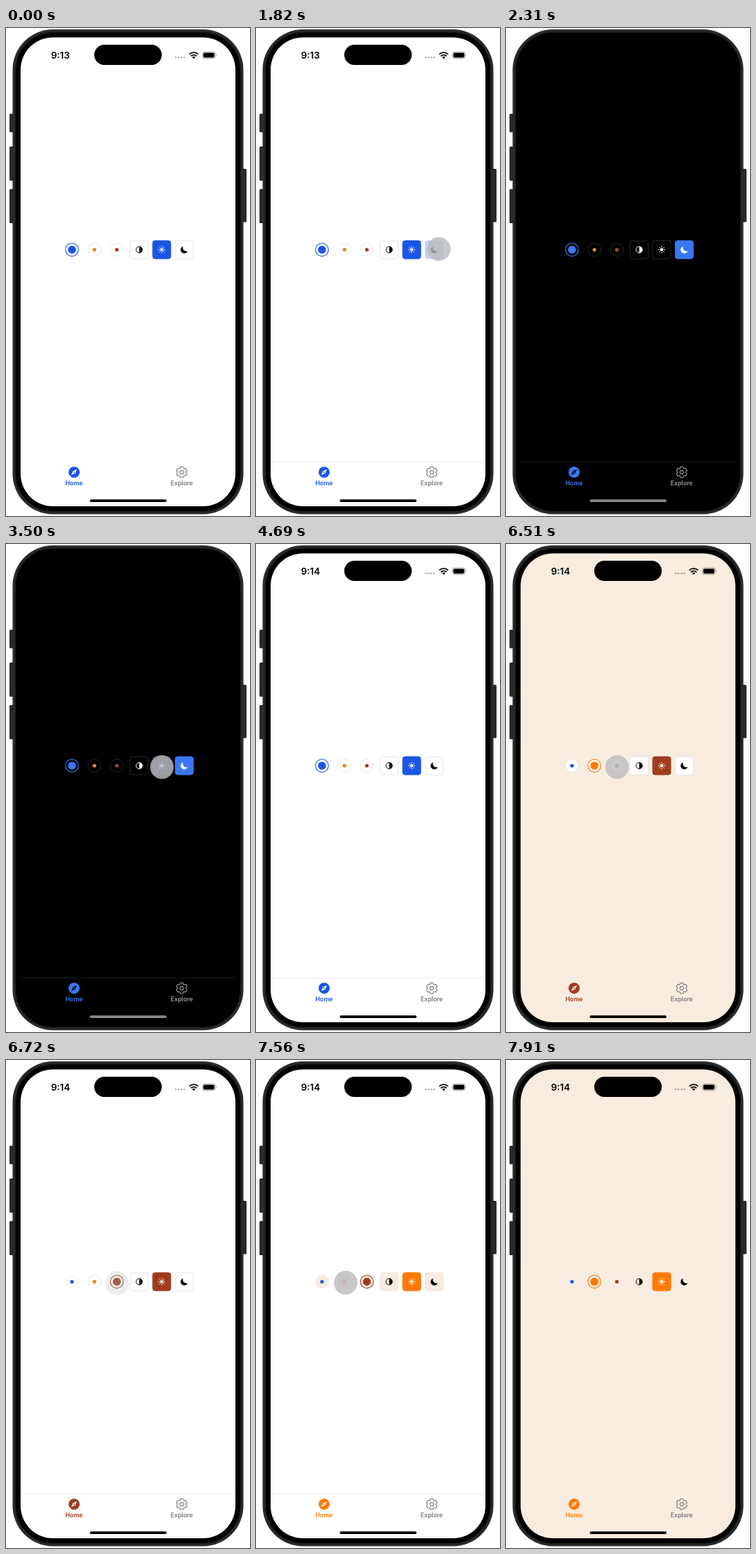
Write an HTML page that moves like this. It is 351x700 px and loops after 8000 ms.

```html
<!DOCTYPE html>
<html lang="en">
<head>
<meta charset="utf-8">
<title>Theme switcher</title>
<style>
  html, body { margin: 0; width: 100%; height: 100%; overflow: hidden; background: #fff; }
  svg { display: block; width: 100%; height: 100%; }
  text { font-family: Inter, "Liberation Sans", sans-serif; font-weight: 600; }
</style>
</head>
<body>
<svg id="stage" viewBox="0 0 351 700" xmlns="http://www.w3.org/2000/svg">
  <g fill="#292b2a">
    <rect x="5" y="123" width="8" height="26.5" rx="1.5"/>
    <rect x="5" y="170" width="8" height="49" rx="1.5"/>
    <rect x="5" y="231" width="8" height="49" rx="1.5"/>
    <rect x="338" y="202" width="8" height="76.5" rx="1.5"/>
  </g>
  <rect x="9.5" y="2" width="332" height="695.5" rx="58" fill="#202322"/>
  <rect x="10.8" y="3.3" width="329.4" height="692.9" rx="56.7" fill="none" stroke="#363938" stroke-width="1"/>
  <rect x="14" y="6.5" width="323" height="686.5" rx="53.5"/>
  <rect id="page" x="21" y="13.5" width="309" height="672.5" rx="46.5"/>

  <text id="clock" x="64.7" y="43.8" font-size="13.4"></text>
  <rect x="127" y="24" width="97" height="29" rx="14.5"/>
  <g fill-opacity=".27">
    <circle cx="244.2" cy="42.2" r="1.4"/><circle cx="248.3" cy="42.2" r="1.4"/>
    <circle cx="252.4" cy="42.2" r="1.4"/><circle cx="256.5" cy="42.2" r="1.4"/>
  </g>
  <g fill="none" stroke="#000" stroke-width="1.9">
    <path d="M263.7 37.7a8.9 8.9 0 0 1 12.6 0M266 40.3a5.7 5.7 0 0 1 8 0"/>
    <path d="M267.8 41.9a3.1 3.1 0 0 1 4.4 0L270 44.2z" fill="#000" stroke="none"/>
  </g>
  <rect x="282.4" y="34.2" width="18.8" height="9.6" rx="3" fill="none" stroke="#000" stroke-opacity=".38" stroke-width=".9"/>
  <rect x="283.8" y="35.6" width="16" height="6.8" rx="1.8"/>
  <path d="M302.2 37.5q1.5 1.5 0 3z" fill-opacity=".45"/>

  <g id="dots"></g>
  <g id="buttons"></g>

  <path id="tabLine" d="M21.5 622.5H329.5" stroke-width="1"/>
  <g id="home">
    <circle cx="98" cy="637.2" r="8"/>
    <path id="needle" d="M102.1 633.1l-2.5 5.6-5.7 2.6 2.5-5.7z"/>
    <circle cx="98" cy="637.2" r="1"/>
    <text x="98" y="656.3" font-size="8.8" text-anchor="middle">Home</text>
  </g>
  <g id="explore">
    <path id="gear" fill="none" stroke-width="1.1" stroke-linejoin="round"/>
    <circle cx="252.8" cy="637.2" r="2.6" fill="none" stroke-width="1.1"/>
    <text x="252.8" y="656.3" font-size="8.8" text-anchor="middle" stroke="none">Explore</text>
  </g>
  <rect id="indicator" x="120.5" y="676.2" width="110.5" height="3.8" rx="1.9"/>
  <circle id="touch" r="17" fill="#bcbcbe"/>
</svg>
<script>
const LOOP = 8000;
const $ = id => document.getElementById(id);

const HUES = {
  light: { blue: '#1a55e6', orange: '#ff7a00', brown: '#a03c1e' },
  dark: { blue: '#3878f4', orange: '#ff851b', brown: '#9c4a2c' }
};
const MODES = {
  light: { ink: '#000', muted: '#7b7b80', line: '#ebebed', border: '#e7e7ee', indicator: '#000' },
  dark: { ink: '#fff', muted: '#98989d', line: '#1b1b1d', border: '#252a2d', indicator: '#88888a' }
};
const START = { mode: 'light', hue: 'blue' };

// Widgets take the new theme at "skin"; page and selection follow at "page".
const TAPS = [
  { x: 263, y: 317, down: 1570, skin: 1885, page: 1955, key: 'moon', theme: { mode: 'dark', hue: 'blue' } },
  { x: 224.3, y: 320, down: 3280, skin: 3565, page: 3635, key: 'sun', theme: { mode: 'light', hue: 'blue' } },
  { x: 127.5, y: 320, down: 4740, skin: 5105, page: 5175, theme: { mode: 'light', hue: 'orange' } },
  { x: 159.8, y: 320, down: 6230, skin: 6490, page: 6575, theme: { mode: 'light', hue: 'brown' } },
  { x: 129, y: 319.5, down: 7270, skin: 7540, page: 7625, theme: { mode: 'light', hue: 'orange' } }
];

function add(parent, tag, attrs) {
  const el = document.createElementNS('http://www.w3.org/2000/svg', tag);
  set(el, attrs);
  return parent.appendChild(el);
}
function set(el, attrs) {
  for (const name in attrs) el.setAttribute(name, attrs[name]);
}
const clamp = v => Math.max(0, Math.min(1, v));
const ease = v => v * v * (3 - 2 * v);

const dots = Object.keys(HUES.light).map((hue, i) => {
  const at = { cx: 94.9 + i * 32.3, cy: 318 };
  return {
    hue,
    ring: add($('dots'), 'circle', { ...at, r: 9.3 }),
    core: add($('dots'), 'circle', at)
  };
});

const rays = Array.from({ length: 8 }, (_, i) => {
  const a = i * Math.PI / 4, c = Math.cos(a), s = Math.sin(a);
  return `M${3.4 * c} ${3.4 * s}L${4.8 * c} ${4.8 * s}`;
}).join('');
const ICONS = {
  contrast: [
    ['circle', { r: 4.5, fill: 'none', 'stroke-width': 1 }],
    ['path', { d: 'M0-4.5a4.5 4.5 0 0 1 0 9z', stroke: 'none' }]
  ],
  sun: [
    ['circle', { r: 2.3, stroke: 'none' }],
    ['path', { d: rays, 'stroke-width': 1, 'stroke-linecap': 'round' }]
  ],
  moon: [['path', { d: 'M-1.7-4.8a5.2 5.2 0 1 0 6.6 6.7a5.2 5.2 0 0 1-6.6-6.7z', stroke: 'none' }]]
};
const buttons = Object.keys(ICONS).map((key, i) => {
  const x = 191.6 + i * 32.4;
  const box = { x: x - 13, y: 305, width: 26, height: 26, rx: 3.5 };
  const button = {
    key,
    card: add($('buttons'), 'rect', box),
    tint: add($('buttons'), 'rect', box),
    icon: add($('buttons'), 'g', { transform: `translate(${x} 318)` })
  };
  ICONS[key].forEach(([tag, attrs]) => add(button.icon, tag, attrs));
  return button;
});

// Six flat teeth around the gear.
const teeth = [];
for (let i = 0; i < 6; i++) {
  for (const [turn, r] of [[-25, 6], [-14, 8], [14, 8], [25, 6]]) {
    const a = (i * 60 - 90 + turn) * Math.PI / 180;
    teeth.push(`${(252.8 + r * Math.cos(a)).toFixed(2)} ${(637.2 + r * Math.sin(a)).toFixed(2)}`);
  }
}
$('gear').setAttribute('d', `M${teeth.join('L')}Z`);

const paper = ({ mode, hue }) =>
  mode === 'dark' ? '#000' : hue === 'orange' ? '#f8ece0' : '#fff';

function themeAt(t, stage) {
  return TAPS.reduce((theme, tap) => t >= tap[stage] ? tap.theme : theme, START);
}

function render(t) {
  const skin = themeAt(t, 'skin'), page = themeAt(t, 'page');
  const colors = MODES[skin.mode], pageColors = MODES[page.mode];
  const accent = HUES[skin.mode][skin.hue];
  const card = paper(skin), ground = paper(page);
  const border = card === '#f8ece0' ? '#f3e7e2' : colors.border;
  const tap = TAPS.find(p => t >= p.down && t < p.page + 260);

  set($('page'), { fill: ground });
  $('clock').textContent = t < 3000 ? '9:13' : '9:14';

  for (const { hue, ring, core } of dots) {
    const on = hue === page.hue, color = HUES[skin.mode][hue];
    set(ring, { fill: card, stroke: on ? color : border, 'stroke-width': on ? 1.15 : 0.9 });
    set(core, { fill: color, r: on ? 5.8 : 2.6 });
  }

  const active = skin.mode === 'dark' ? 'moon' : 'sun';
  for (const { key, card: box, tint, icon } of buttons) {
    const on = key === active;
    const pressed = tap && tap.key === key && t >= tap.down + 170 && t < tap.skin;
    const ink = on ? '#fff' : colors.ink;
    set(box, { fill: on ? accent : card, stroke: on ? accent : border });
    set(tint, { fill: accent, 'fill-opacity': pressed ? 0.25 : 0 });
    set(icon, { fill: ink, stroke: ink });
  }

  const lined = t >= 60 && ground !== '#f8ece0';
  set($('tabLine'), { stroke: pageColors.line, opacity: lined ? 1 : 0 });
  set($('home'), { fill: accent });
  set($('needle'), { fill: ground });
  set($('explore'), { fill: pageColors.muted, stroke: pageColors.muted });
  set($('indicator'), { fill: pageColors.indicator });

  if (tap) {
    const shown = ease(clamp((t - tap.down) / 150)) * (1 - ease(clamp((t - tap.page) / 240)));
    set($('touch'), { cx: tap.x, cy: tap.y, opacity: 0.82 * shown });
  } else {
    set($('touch'), { opacity: 0 });
  }
}

const began = performance.now();
function frame() {
  render((performance.now() - began) % LOOP);
  requestAnimationFrame(frame);
}
render(0);
requestAnimationFrame(frame);
</script>
</body>
</html>
```
